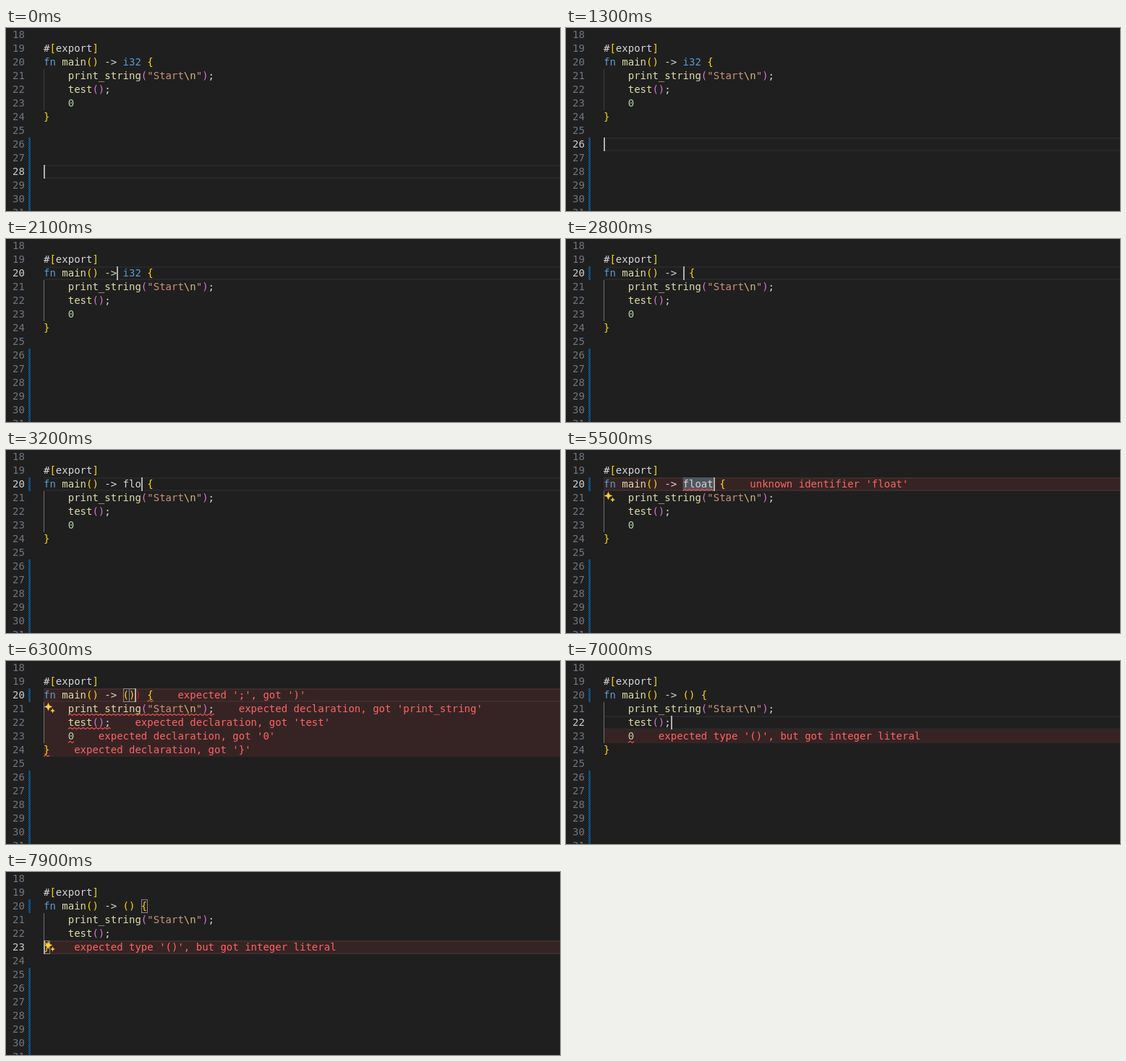
These frames come from a looping animation (766x254 px, 8 s). An HTML page with a canvas:

```html
<!DOCTYPE html>
<html lang="en">
<head>
<meta charset="utf-8">
<title>Editor</title>
<style>
  html, body { margin: 0; width: 100%; height: 100%; overflow: hidden; background: #1f1f1f; }
  canvas { display: block; }
</style>
</head>
<body>
<canvas id="stage" width="766" height="254"></canvas>
<script>
const ctx = document.getElementById('stage').getContext('2d');
const LOOP = 8000, LEFT = 52, CHAR = 14 * 0.60205, ROW = 19;
const KEY = '#569cd6', FN = '#dcdcaa', TEXT = '#d4d4d4', GOLD = '#ffd700', PINK = '#da70d6',
      STR = '#ce9178', ESC = '#d7ba7d', NUM = '#b5cea8', RED = '#ff6464';

const yAt = line => (line - 18) * ROW;
const xAt = col => LEFT + col * CHAR;

// An error is [line, column, underlined characters, message].
const unknown = [[20, 13, 5, "unknown identifier 'float'"]];
const syntax = [
  [20, 17, 1, "expected ';', got ')'"],
  [21, 4, 24, "expected declaration, got 'print_string'"],
  [22, 4, 7, "expected declaration, got 'test'"],
  [23, 4, 1, "expected declaration, got '0'"],
  [24, 0, 1, "expected declaration, got '}'"]
];
const mistyped = [[23, 4, 1, "expected type '()', but got integer literal"]];
const braces = [[20, 19], [24, 0]];

// Each step starts at a time and overrides part of the state.
const steps = [
  [0, { line: 28, col: 0, type: 'i32', errors: [], boxes: [], select: null,
        spark: 0, edited: false, short: false, caret: true }],
  [300, { caret: false }],
  [800, { caret: true }],
  ...[27, 26, 25, 24, 23, 22, 20].map((line, i) => [1200 + i * 100, { line }]),
  [1900, { col: 2 }],
  [2000, { col: 7 }],
  [2100, { col: 12 }],
  [2400, { col: 16 }],
  [2800, { type: '', col: 13, edited: true }],
  ...[1, 2, 3, 4, 5].map(n => [2900 + n * 100, { type: 'float'.slice(0, n), col: 13 + n }]),
  [3800, { errors: unknown }],
  [4000, { col: 20, boxes: braces }],
  [4100, { line: 21 }],
  [4200, { line: 22, col: 11 }],
  [4600, { line: 21, col: 20 }],
  [4700, { line: 20 }],
  [5100, { col: 18, boxes: [], select: [13, 5] }],
  [5500, { spark: 21 }],
  [5700, { type: '(float)', col: 19, select: [14, 5] }],
  [5800, { type: '())', col: 15, select: null }],
  [5900, { boxes: [[20, 13], [20, 14]] }],
  [6100, { errors: syntax }],
  [6400, { type: '()' }],
  [6700, { errors: mistyped, spark: 0 }],
  [6900, { line: 21, boxes: [] }],
  [7000, { line: 22, col: 11 }],
  [7100, { line: 23, col: 5 }],
  [7400, { col: 0, short: true, boxes: [[20, 16], [23, 0]],
           errors: [[23, 0, 0, mistyped[0][3]]] }],
  [7800, { spark: 23 }]
];

function stateAt(t) {
  return Object.assign({}, ...steps.filter(s => s[0] <= t).map(s => s[1]));
}

function typeTokens(type) {
  if (type === 'i32') return [[KEY, type]];
  if (type[0] !== '(') return [[TEXT, type]];
  if (type === '())') return [[GOLD, '()'], ['#d51919', ')']];
  return [[GOLD, '('], [TEXT, type.slice(1, -1)], [GOLD, ')']];
}

function codeLines(s) {
  const lines = [
    [[TEXT, '#'], [GOLD, '['], [TEXT, 'export'], [GOLD, ']']],
    [[KEY, 'fn '], [FN, 'main'], [GOLD, '()'], [TEXT, ' -> '], ...typeTokens(s.type), [GOLD, ' {']],
    [[FN, '    print_string'], [PINK, '('], [STR, '"Start'], [ESC, '\\n'], [STR, '"'], [PINK, ')'], [TEXT, ';']],
    [[FN, '    test'], [PINK, '()'], [TEXT, ';']],
    [[NUM, '    0']],
    [[GOLD, '}']]
  ];
  if (s.short) lines.splice(4, 1);
  return lines;
}

function rect(color, x, y, w, h) {
  ctx.fillStyle = color;
  ctx.fillRect(x, y, w, h);
}

function write(color, text, x, line) {
  ctx.fillStyle = color;
  ctx.fillText(text, x, yAt(line) + 14);
}

function hatch(y, end) {
  for (; y < end; y++) {
    rect('#17354d', 31, y, 3, 1);
    rect('#0078d4', 31 + (3 - y % 3) % 3, y, 1, 1);
  }
}

function squiggle(line, col, count) {
  const x = xAt(col), y = yAt(line) + 16.5, end = xAt(col + count);
  ctx.save();
  ctx.beginPath();
  ctx.rect(x, y - 1, end - x, 4);
  ctx.clip();
  ctx.beginPath();
  for (let i = 0; x + i * 3 < end + 3; i++) ctx.lineTo(x + i * 3, y + (i % 2 ? 0 : 2));
  ctx.strokeStyle = '#f14c4c';
  ctx.lineWidth = 1.1;
  ctx.stroke();
  ctx.restore();
}

function star(x, y, r) {
  ctx.beginPath();
  for (let i = 0; i < 8; i++) {
    const d = i % 2 ? r * 0.42 : r, a = i * Math.PI / 4;
    ctx.lineTo(x + d * Math.cos(a), y + d * Math.sin(a));
  }
  ctx.fillStyle = '#ffcc33';
  ctx.fill();
}

function draw(t) {
  const s = stateAt(t), code = codeLines(s), last = s.short ? 23 : 24;
  const length = line => code[line - 19].reduce((n, token) => n + token[1].length, 0);
  rect('#1f1f1f', 0, 0, 766, 254);
  ctx.font = '14px "DejaVu Sans Mono", monospace';

  // backgrounds
  rect('#282828', LEFT, yAt(s.line), 714, 2);
  rect('#282828', LEFT, yAt(s.line) + 17, 714, 2);
  for (const [line] of s.errors) rect('rgba(255,80,80,.1)', LEFT, yAt(line), 714, ROW);
  if (s.select) rect('#50565f', xAt(s.select[0]), yAt(20), s.select[1] * CHAR, ROW);
  const inside = s.line >= 20 && s.line <= last;
  rect(inside ? '#707070' : '#404040', LEFT, yAt(21), 1, yAt(last) - yAt(21));

  // gutter
  for (let n = 18; n < 32; n++) write(n === s.line ? '#cccccc' : '#6e7681', String(n), 9, n);
  if (s.edited) hatch(yAt(20), yAt(21));
  hatch(yAt(s.short ? 25 : 26), 254);

  // code
  code.forEach((tokens, i) => {
    let col = 0;
    for (const [color, text] of tokens) {
      write(color, text, xAt(col), 19 + i);
      col += text.length;
    }
  });
  for (const [line, col, count, message] of s.errors) {
    if (count) squiggle(line, col, count);
    write(RED, message, xAt(length(line) + 4), line);
  }
  ctx.strokeStyle = '#888888';
  ctx.lineWidth = 1;
  for (const [line, col] of s.boxes) {
    ctx.strokeRect(Math.round(xAt(col)) + 0.5, yAt(line) + 0.5, 8, ROW - 1);
  }
  if (s.spark) {
    star(58.5, yAt(s.spark) + 6.5, 5.8);
    star(64.5, yAt(s.spark) + 12, 3.4);
  }
  if (s.caret) rect('#aeafad', Math.round(xAt(s.col)), yAt(s.line), 2, ROW);
}

function tick() {
  draw(performance.now() % LOOP);
  requestAnimationFrame(tick);
}
tick();
</script>
</body>
</html>
```
